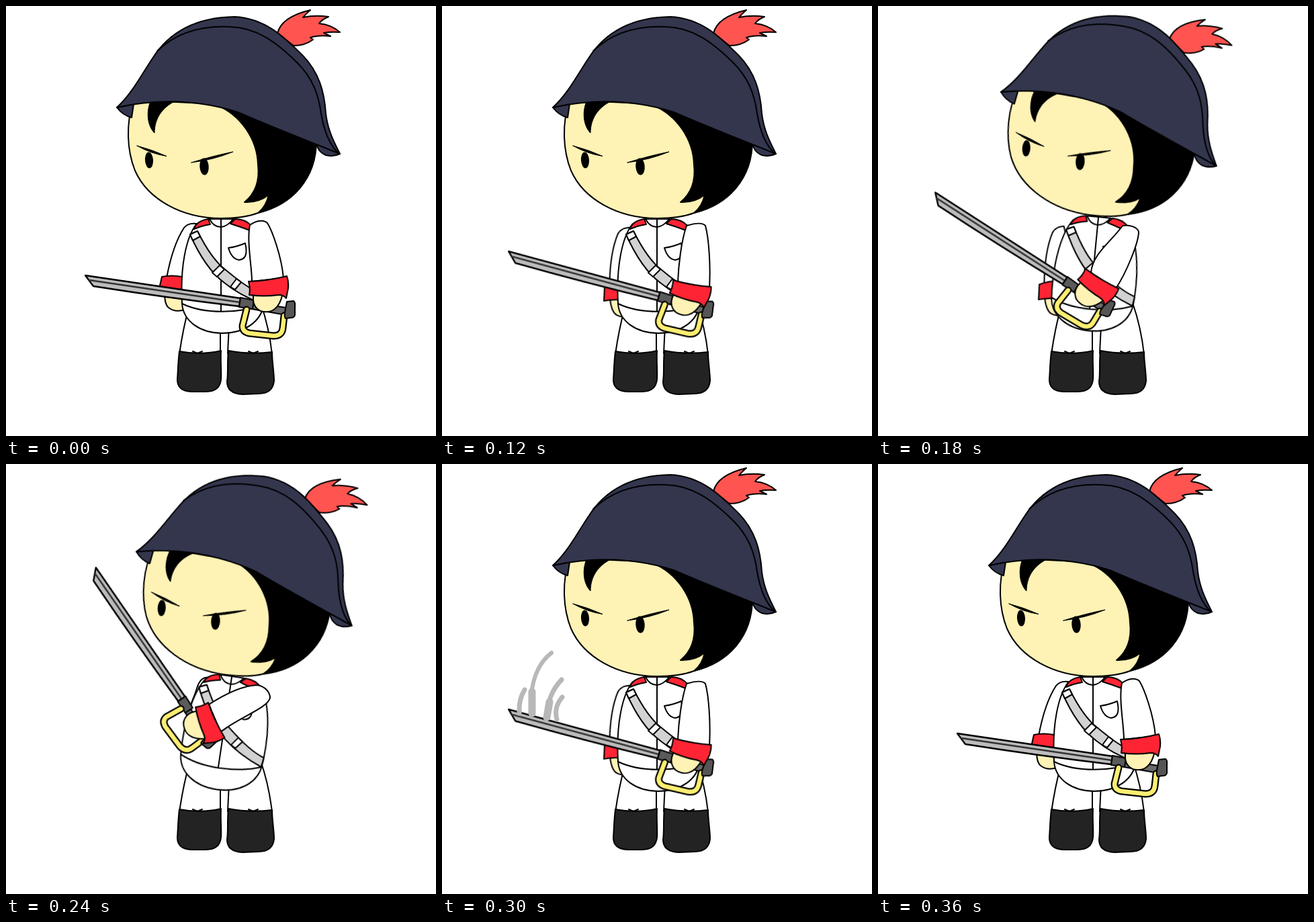
Recreate the animation shown at these times as an HTML page. Size 640 px wide and 640 px high, loop 420 ms.

```html
<!DOCTYPE html>
<html lang="en">
<head>
<meta charset="utf-8">
<title>Soldier drawing a sabre</title>
<style>
  html, body { margin: 0; width: 100%; height: 100%; overflow: hidden; background: #fff; }
  svg { display: block; width: 100%; height: 100%; }

  .ink { stroke: #000; stroke-width: 2; stroke-linejoin: round; stroke-linecap: round; }
  .cloth { fill: #fff; }
  .red { fill: #ff2433; }
  .skin { fill: #fff2b5; }
  .navy { fill: #33364d; }
  .boot { fill: #232323; }
  .none { fill: none; }

  /* every pose is held, then swapped at once */
  .anim, .pose { animation: 420ms step-end infinite; }
  .head { animation-name: head; }
  .torso { animation-name: torso; transform-origin: 320px 318px; }
  .far { animation-name: far; transform-origin: 270px 325px; }
  .sabre { animation-name: sabre; transform-origin: 423px 452px; }
  .fist { animation-name: fist; transform-origin: 361px 410px; }
  .rest { animation-name: rest; }
  .ready { animation-name: ready; }
  .lift { animation-name: lift; }
  .high { animation-name: high; }
  .swish { animation-name: swish; }

  @keyframes head {
    0%, 71.4286%, 100% { transform: none; }
    42.8571% { transform: translate(38.2px, -42.5px) rotate(7.2deg); }
    57.1429% { transform: translate(49.2px, -40px) rotate(7.2deg); }
  }
  @keyframes torso {
    0%, 71.4286%, 100% { transform: none; }
    42.8571% { transform: translate(8px, -3px) rotate(5.5deg); }
    57.1429% { transform: translate(16px, -1px) rotate(8.5deg); }
  }
  @keyframes far {
    0%, 85.7143%, 100% { transform: none; visibility: visible; }
    28.5714%, 71.4286% { transform: translate(-4px, 8px) rotate(-10deg); visibility: visible; }
    42.8571% { transform: translate(-6px, 6px) rotate(-10deg); visibility: visible; }
    57.1429% { transform: none; visibility: hidden; }
  }
  @keyframes sabre {
    0%, 85.7143%, 100% { transform: none; }
    28.5714%, 71.4286% { transform: translate(-27px, 0) rotate(6.8deg); }
    42.8571% { transform: translate(-81px, -2px) rotate(24.4deg); }
    57.1429% { transform: translate(-118.5px, -40px) rotate(47deg); }
  }
  @keyframes fist {
    0%, 85.7143%, 100% { transform: none; }
    28.5714%, 71.4286% { transform: translate(-17px, -2px) rotate(18deg); }
    42.8571% { transform: translate(-52px, -19px) rotate(39deg); }
    57.1429% { transform: translate(-60px, -55px) rotate(73deg); }
  }
  @keyframes rest {
    0%, 85.7143%, 100% { visibility: visible; }
    28.5714% { visibility: hidden; }
  }
  @keyframes ready {
    0%, 42.8571%, 85.7143%, 100% { visibility: hidden; }
    28.5714%, 71.4286% { visibility: visible; }
  }
  @keyframes lift {
    0%, 57.1429%, 100% { visibility: hidden; }
    42.8571% { visibility: visible; }
  }
  @keyframes high {
    0%, 71.4286%, 100% { visibility: hidden; }
    57.1429% { visibility: visible; }
  }
  @keyframes swish {
    0%, 85.7143%, 100% { visibility: hidden; }
    71.4286% { visibility: visible; }
  }
</style>
</head>
<body>
<svg viewBox="0 0 640 640">

  <!-- far arm -->
  <g class="anim far ink">
    <path class="skin" d="M237 420C235 434 237 445 242 449C250 455 260 454 266 452V420Z"/>
    <path class="cloth" d="M283 324C276 323 270 324 265 330C252 350 244 378 239 405L264 407L284 345Z"/>
    <path class="red" d="M232 403Q246 400 262 403V430Q244 425 227 425Z"/>
  </g>
  <path class="pose high cloth ink" d="M302 318C292 316 287 324 284 334C280 348 273 360 269 378L292 380Z"/>

  <!-- legs -->
  <g class="ink">
    <path class="cloth" d="M273 445C267 467 262 490 258 518L319 517V475Z"/>
    <path class="cloth" d="M332 475L330 517L396 518C393 492 387 465 379 442Z"/>
    <path class="boot" d="M258 514Q290 520 320 513C319 530 321 545 320 556Q318 574 298 574H276Q255 573 255 556C256 543 256 530 258 514Z"/>
    <path class="boot" d="M331 513Q362 519 396 515C396 530 399 545 399 558Q397 577 376 577L352 578Q329 577 329 559C331 545 329 530 331 513Z"/>
    <path class="none" d="M278 514L285 517L292 514M361 514L368 517L375 514"/>
  </g>

  <!-- torso -->
  <g class="anim torso ink">
    <path class="cloth" d="M303 317L283 325C268 345 259 388 262 443C264 470 290 487 322 487C355 487 380 470 384 443C388 400 384 355 366 327L338 317Z"/>
    <path class="none" d="M320 318V454M262 443C295 459 348 458 384 444"/>
    <path class="none" d="M331 360Q345 358 356 353C360 370 356 377 347 378C339 377 334 370 331 360Z"/>
    <path fill="#d2d2d2" d="M274 340L285 335C296 357 309 379 326 392C344 407 364 423 385 430L383 444C362 436 342 426 325 412C301 394 285 365 274 340Z"/>
    <path class="cloth" d="M274 340L285 335L289 343L278 349ZM307 397L318 386L325 392L314 403ZM334 418L343 406L350 411L341 422Z"/>
    <path class="red" d="M280 332Q283 320 301 317L304 325Q291 327 280 332ZM341 317Q357 317 366 328L363 334Q350 329 334 324Z"/>
    <path class="cloth" d="M303 317C307 325 313 329 320 329C328 328 333 324 338 317Z"/>
    <path class="none" d="M320 317V329"/>
  </g>

  <!-- near sleeve, one shape for each pose -->
  <g class="cloth ink">
    <path class="pose rest" d="M363 326C371 320 383 317 389 323C396 334 410 372 413 405L366 410C366 388 358 350 363 326Z"/>
    <path class="pose ready" d="M364 327C374 324 387 321 392 327C397 345 400 384 398 420L351 411C352 386 356 350 364 327Z"/>
    <path class="pose lift" d="M364 327C374 325 386 329 388 336C388 351 371 395 353 422L317 397C319 369 347 351 364 327Z"/>
    <path class="pose high" d="M302 358C325 343 352 330 374 329C386 331 393 340 393 348C390 363 347 377 319 399Z"/>
  </g>

  <!-- sabre -->
  <g class="anim sabre ink">
    <path fill="#bcbcbc" style="stroke-width:2.4" d="M118 401Q235 418 349 435L347 447Q238 434 130 417Z"/>
    <path class="none" style="stroke:#333;stroke-width:2.6" d="M124 408Q236 424 348 441"/>
    <path fill="#6a6a6a" d="M366 441L417 449V460L366 451Z"/>
    <path fill="#5a5a5a" d="M349 434L369 438L367 451L347 448Z"/>
    <path class="none" style="stroke-width:11" d="M358 452L352 476Q352 485 362 487L398 491Q411 491 412 479L414 461"/>
    <path class="none" style="stroke:#fbee72;stroke-width:6.5" d="M358 452L352 476Q352 485 362 487L398 491Q411 491 412 479L414 461"/>
    <path fill="#555" d="M418 440L428 439Q431 441 430 447V460Q429 464 424 464L416 465Q414 462 415 456Z"/>
  </g>

  <!-- near hand and cuff -->
  <g class="anim fist ink">
    <path class="skin" d="M369 427C366 440 369 449 379 454C393 458 407 453 412 427Z"/>
    <path class="red" d="M361 410Q390 409 418 402Q421 410 420 420L417 435Q413 430 406 430Q384 433 362 430Q364 420 361 410Z"/>
  </g>

  <!-- swish -->
  <g class="pose swish none" stroke="#b8b8b8" stroke-width="7" stroke-linecap="round">
    <path d="M115 371Q114 350 123 336"/>
    <path d="M134 371V339" stroke-width="11"/>
    <path d="M133 342C136 316 146 294 163 281" stroke-width="6"/>
    <path d="M157 376Q156 344 178 321"/>
    <path d="M156 377L160 354" stroke-width="11"/>
    <path d="M171 380Q166 362 179 347"/>
  </g>

  <!-- head -->
  <g class="anim head ink">
    <path class="skin" d="M190 140C178 175 180 215 192 245C211 288 262 316 320 316C345 316 362 313 375 308C425 296 462 258 462 200L400 150Z"/>
    <path d="M315 148C350 163 374 199 375 236C378 262 370 280 355 292Q376 293 391 281Q387 299 375 308C427 293 459 258 462 200L400 150Z"/>
    <path d="M215 142C208 159 211 179 221 189C221 169 231 152 251 142Z" stroke-width="1"/>
    <ellipse cx="213" cy="229.5" rx="5" ry="11" transform="rotate(-4 213 230)"/>
    <ellipse cx="295" cy="239" rx="5.7" ry="11.5" transform="rotate(-4 295 239)"/>
    <path style="stroke-width:1" d="M195 208Q218 214 239 223.5Q216 220 195 208ZM276 233Q308 223 338 217Q309 229 276 233Z"/>
    <path fill="#ff5450" d="M404 41C408 22 428 12 453 6Q446 12 442 17Q460 13 480 16Q470 20 466 26Q485 28 497 39Q483 38 473 40L483 45Q465 43 453 47L457 50Q445 59 428 59Z"/>
    <path class="navy" d="M165 151Q174 163 187 166L190 146ZM461 200Q463 217 476 222Q487 225 497 220Z"/>
    <path class="navy" d="M165 151C188 130 203 100 218 78C240 43 278 17 340 16C386 18 415 47 442 74C466 99 474 128 476 160C479 185 488 202 497 220C460 205 400 182 345 158C285 139 225 138 165 151Z"/>
    <path class="none" d="M225 67C255 38 295 29 334 31C372 32 402 53 434 85C456 107 465 131 469 160C473 184 481 207 496 220"/>
  </g>
</svg>
</body>
</html>
```
